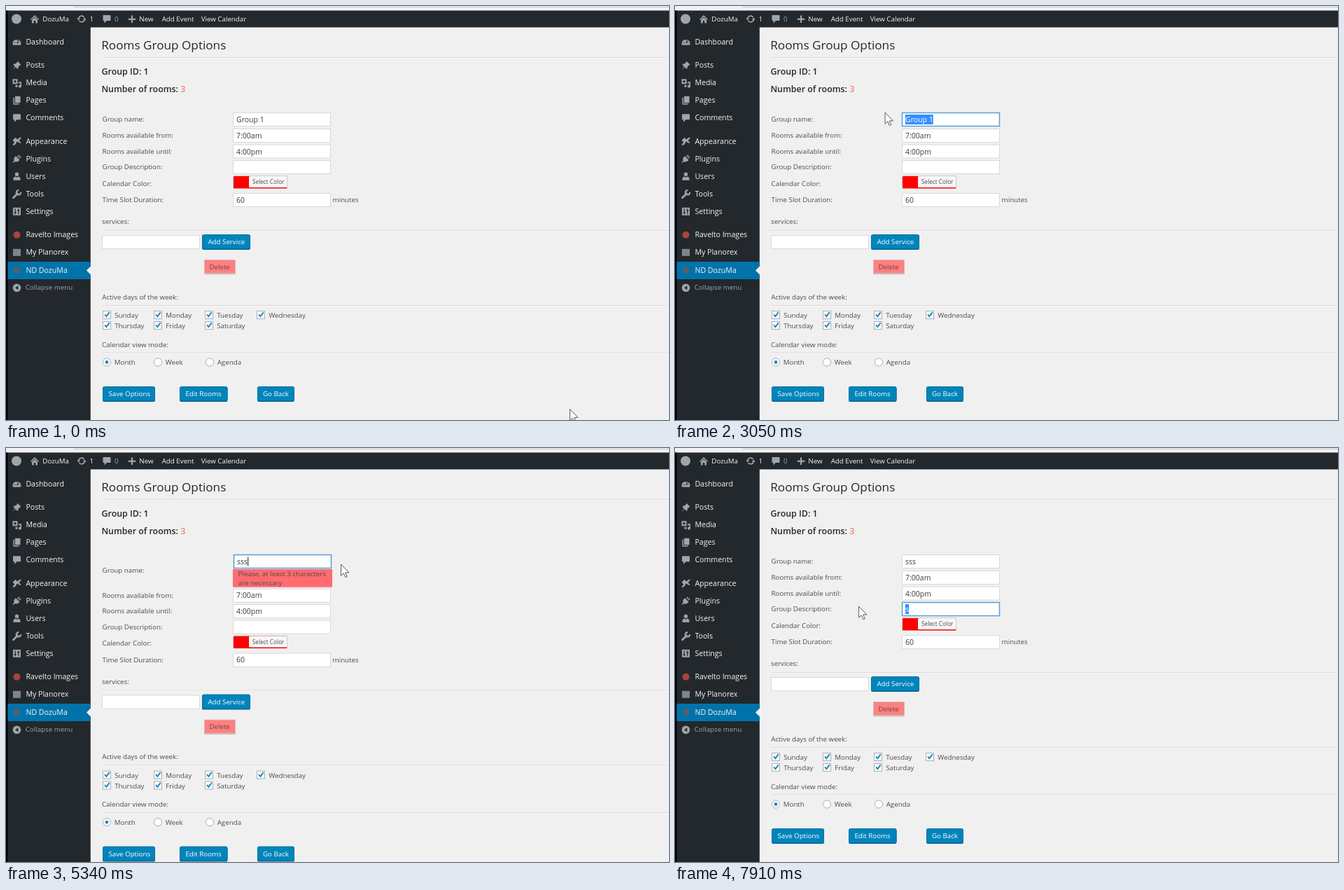
Animation, 947 px wide and 591 px high, one loop 8000 ms. Source, as an HTML page:

```html
<!DOCTYPE html>
<html lang="en">
<head>
<meta charset="utf-8">
<title>Rooms Group Options</title>
<style>
html, body { margin: 0; width: 100%; height: 100%; overflow: hidden; background: #f0f0f0; }
svg { display: block; width: 947px; height: 591px; font-family: "Open Sans", "Noto Sans", sans-serif; font-size: 9.75px; fill: #4c4c4c; }
text { white-space: pre; }
.menu { font-size: 10.6px; fill: #f4f4f4; }
.field { font-size: 10.5px; fill: #3c3c3c; }
.head { font-size: 12.4px; font-weight: 600; fill: #23282d; }
.icon { fill: #a0a5aa; stroke: none; }
.line { fill: none; stroke: #a0a5aa; stroke-width: 1.6; }
.box { fill: #fff; stroke: #d9d9d9; }
.focus { fill: #fff; stroke: #5b9dd9; stroke-width: 1.5; }
</style>
</head>
<body>
<svg id="stage" viewBox="0 0 947 591"></svg>
<script>
const LOOP = 8000, STEP = 78.4, FIRST = 70;
const ERROR_SHIFT = 25.6;
const FIELD_X = 329;

const rect = (x, y, w, h, fill, more = '') =>
  `<rect x="${x}" y="${y}" width="${w}" height="${h}" fill="${fill}" ${more}/>`;
const text = (x, y, s, cls = '', more = '') =>
  `<text x="${x}" y="${y}" class="${cls}" ${more}>${s}</text>`;
const path = (d, cls = 'icon', more = '') => `<path d="${d}" class="${cls}" ${more}/>`;
const disc = (r, fill = '#a0a5aa', x = 0, y = 0) => `<circle cx="${x}" cy="${y}" r="${r}" fill="${fill}"/>`;
const at = (x, y, s) => `<g transform="translate(${x} ${y})">${s}</g>`;
const rule = y => rect(137, y, 810, 1, '#dadada') + rect(137, y + 1, 810, 1, '#f8f8f8');
const input = (x, y) => `<rect class="box" x="${x + .5}" y="${y + .5}" width="139" height="19"/>`;
const button = (x, y, w, tx, s) =>
  rect(x, y + 1, w, 21, '#006799', 'rx="2.2"') +
  rect(x + .5, y + .5, w - 1, 20, '#0085ba', 'rx="2" stroke="#006fa3"') +
  text(tx, y + 14, s, '', 'fill="#fff"');
const check = (x, y, label) =>
  rect(x + .5, y + .5, 11, 11, '#fff', 'stroke="#a9afb4"') +
  path(`M${x + 3} ${y + 5.4}l2.4 2.8 4.4-6`, 'line', 'style="stroke:#1e8cbe;stroke-width:2"') +
  text(x + 17.2, y + 10, label);
const radio = (x, label, on) =>
  `<circle cx="${x}" cy="508.5" r="5.6" fill="#fff" stroke="#a9afb4"/>` +
  (on ? disc(2.4, '#1e8cbe', x, 508.5) : '') + text(x + 10.7, 512, label);

const dark = 'style="stroke:#23282d;stroke-width:1.2"';
const bubble = path('M-4.5-5.5h9q1 0 1 1v6q0 1-1 1h-4.5l-3.5 3.5v-3.5h-1q-1 0-1-1v-6q0-1 1-1z');
const icons = {
  gauge: path('M-5.6 4.5A6 6 0 1 1 5.6 4.5z') + path('M-3.6 1h1.4M0-3.8v1.4M3.6 1H2.2M0 2L2.3-2.2', 'line', dark),
  pin: path('M1-6L6-1 4.5-.4 2.2 2 2 4.5.8 5-1.7 2.5-6 6-2.6 1.6-5-.9-4.4-2-2-2.2.5-4.5z'),
  media: path('M-6-5.5h7v7h-7z') + disc(1.7, '#23282d', -2.5, -2) + path('M2.5-1.5h4v6.2a2 2 0 1 1-1.5-1.8V.5H2.5z') + path('M-2 3h3v3h-3z'),
  pages: path('M-2.5-6h7.5v9.5h-7.5z') + path('M-5-4h1.5v8.5h6.5V6h-8z'),
  bubble,
  brush: path('M-6-1.5L-2-5.5 2.2-1.3-1.8 2.7z') + path('M1.2-3.6L5.2-6 6.2-5 3.2-1 6 1.6 4.8 2.8 1 .6zM-2.8.8L-.6 3-4.6 6-6 4.6z'),
  plug: path('M-1.5-4L4 1.5 2 3.5Q-1 5-3.2 3.7L-5 5.6-6 4.6-4 2.8Q-5 0-3.5-2z') + path('M1-3l2.5-2.5M3-1l2.5-2.5', 'line'),
  user: disc(2.7, undefined, 0, -3) + path('M-5 5.5V3Q-4.5.5-2 .3L0 1.5 2 .3Q4.5.5 5 3v2.5z'),
  wrench: path('M-5 5L1-1', 'line', 'style="stroke-width:2.8;stroke-linecap:round"') + path('M5.6-3A3.2 3.2 0 1 1 2.8-5.7', 'line', 'style="stroke-width:2.2"'),
  sliders: path('M-5.5-5.5h11v11h-11z') + path('M-2.3-4v8M2.3-4v8M-4 1.5h3.4M.6-1.5H4', 'line', dark),
  red: disc(5, '#a8443a'),
  square: rect(-5.5, -5, 11, 10, '#7d858b'),
  dot: disc(5, '#52606c'),
  fold: disc(5.8) + path('M1.8-3v6L-2.4 0z', '', 'fill="#23282d"')
};

const menu = [
  [51, 'gauge', 'Dashboard'], [84.5, 'pin', 'Posts'], [109.5, 'media', 'Media'],
  [134.5, 'pages', 'Pages'], [159.5, 'bubble', 'Comments'], [193, 'brush', 'Appearance'],
  [218, 'plug', 'Plugins'], [243, 'user', 'Users'], [268.5, 'wrench', 'Tools'],
  [293, 'sliders', 'Settings'], [326.5, 'red', 'Ravelto Images'],
  [351.5, 'square', 'My Planorex'], [377, 'dot', 'ND DozuMa']
];

const chrome =
  rect(0, 0, 947, 6.5, '#f1f1f1') + rect(97, 1, 850, 1, '#c6c6c6') +
  rect(0, 6.5, 947, 24, '#23282d') + rect(0, 30, 120.8, 561, '#23282d') + rect(0, 6.5, 2.5, 585, '#000') +
  rect(2.5, 365, 118.3, 25, '#0073aa') + path('M121 371.5v12l-6-6z', '', 'fill="#f0f0f0"') +
  menu.map(([y, icon, label]) => at(15.5, y + .3, icons[icon]) + text(28.4, y + 3.9, label, 'menu')).join('') +
  at(15.5, 402.3, icons.fold) + text(27.7, 405.4, 'Collapse menu', '', 'fill="#a0a5aa"') +
  at(15, 18.5, disc(7)) +
  at(41, 19, path('M0-6L6 0 5 1 0-3.8-5 1-6 0zM-4 1l4-3.8L4 1v4.5H1.3V2h-2.6v3.5H-4z')) +
  at(108, 18.5, path('M-4.3-1A4.4 4.4 0 0 1 3.6-2.4M4.3 1A4.4 4.4 0 0 1-3.6 2.4', 'line') +
    path('M-6.8-1h5L-4.3 2zM6.8 1h-5L4.3-2z')) +
  at(144, 18.5, bubble) + at(180, 18.8, path('M-5.2 0H5.2M0-5.2V5.2', 'line', 'style="stroke-width:2.2"')) +
  [[52.3, 'DozuMa'], [119.4, '1'], [190.3, 'New'], [222.7, 'Add Event'], [278.7, 'View Calendar']]
    .map(([x, s]) => text(x, 21.8, s, '', 'fill="#f4f4f4"')).join('') +
  text(155, 21.8, '0', '', 'fill="#9ca1a6"');

const heading =
  text(136.2, 62, 'Rooms Group Options', '', 'style="font-size:17.15px;fill:#23282d"') + rule(73) +
  text(136.6, 98, 'Group ID: 1', 'head') +
  text(136.4, 122.6, 'Number of rooms: <tspan fill="#ff7b7b">3</tspan>', 'head');

const lower =
  [[188, 'Rooms available from:'], [210.6, 'Rooms available until:'], [233.2, 'Group Description:'],
   [256.7, 'Calendar Color:'], [280, 'Time Slot Duration:']].map(([y, s]) => text(137.6, y, s)).join('') +
  input(324, 175) + text(FIELD_X, 188.8, '7:00am', 'field') +
  input(324, 197.5) + text(FIELD_X, 211.6, '4:00pm', 'field') +
  '<g id="desc"></g>' +
  rect(324.5, 242.5, 77, 17.5, '#f00', 'rx="2" stroke="#ccc"') + rect(325, 259, 76.5, 1.4, '#f00') +
  rect(347, 243, 54.3, 16, '#f7f7f7', 'rx="1.5"') + rect(401, 243, 1, 16, '#ccc') +
  text(352, 254, 'Select Color', '', 'style="font-size:8.25px"') +
  input(324, 267) + text(FIELD_X, 280.6, '60', 'field') + text(466.6, 280, 'minutes') +
  text(137, 311.4, 'services:') + rule(320) + input(137, 327) +
  button(280, 326, 69, 288.4, 'Add Service') +
  rect(283, 363, 45, 20.3, '#c9bdbd', 'rx="1"') +
  rect(283.5, 362.5, 44, 19, '#ff8080', 'rx="1" stroke="#d9b5b5"') + text(290.4, 375.6, 'Delete', '', 'fill="#6e4444"') +
  text(137.3, 418.8, 'Active days of the week:') + rule(427) +
  ['Sunday', 'Monday', 'Tuesday', 'Wednesday', 'Thursday', 'Friday', 'Saturday']
    .map((d, i) => check([138, 211, 284, 358][i % 4], i < 4 ? 435 : 450, d)).join('') +
  text(136.9, 486.7, 'Calendar view mode:') + rule(494.5) +
  radio(144, 'Month', true) + radio(217, 'Week') + radio(291, 'Agenda') +
  button(138, 543, 75, 146.4, 'Save Options') + button(248, 543, 68.5, 256.4, 'Edit Rooms') +
  button(359, 543, 53, 366.9, 'Go Back');

const error =
  rect(324, 173, 142, 25.7, '#ff6b70') +
  text(331.6, 183.2, 'Please, at least 3 characters') + text(331.8, 195.6, 'are necessary');

const stage = document.getElementById('stage');
stage.innerHTML =
  rect(0, 0, 947, 591, '#f0f0f0') + heading +
  text(137.6, 165, 'Group name:', '', 'id="label"') +
  `<g id="lower">${lower}</g><g id="error">${error}</g><g id="name"></g>` + chrome +
  '<g id="cursor">' +
  path('M0 0V16.2L3.8 12.8 6.3 18.6 8.7 17.6 6.2 11.9H11.4z', '', 'id="arrow" fill="#fff" stroke="#484848" stroke-width=".9"') +
  path('M-4.5-8H-1.2L0-7.2 1.2-8H4.5M-4.5 8H-1.2L0 7.2 1.2 8H4.5M0-7.2V7.2M-1.8 2H1.8', '', 'id="beam" fill="none" stroke="#333" stroke-width="1.3"') +
  '</g>';
const $ = id => document.getElementById(id);

// Editable field: box, text, selection with clipped white copy, caret
function makeField(id, y) {
  const clip = id + 'Clip', base = y + 14;
  $(id).innerHTML =
    `<clipPath id="${clip}"><rect y="${y + 3}" height="14"/></clipPath>` + input(324, y) +
    text(FIELD_X, base, '', 'field') + rect(0, y + 3, 0, 14, '#338fff') +
    text(FIELD_X, base, '', 'field', `style="fill:#fff" clip-path="url(#${clip})"`) +
    rect(0, y + 3.5, 1, 13, '#222');
  const [clipEl, box, plain, mark, light, caret] = $(id).children;
  const edge = i => i === 0 ? FIELD_X : FIELD_X + plain.getSubStringLength(0, i);
  return {
    draw(value, focused, sel) {
      if (plain.textContent !== value) plain.textContent = light.textContent = value;
      box.setAttribute('class', focused ? 'focus' : 'box');
      const [a, b] = sel || [value.length, value.length];
      const x = edge(a), w = edge(b) - x;
      for (const r of [mark, clipEl.firstChild]) {
        r.setAttribute('x', x);
        r.setAttribute('width', focused ? w : 0);
      }
      caret.setAttribute('x', x + .2);
      caret.style.display = focused && a === b ? '' : 'none';
    },
    charAt(x) {
      let best = 0;
      for (let i = 1; i <= plain.textContent.length; i++)
        if (Math.abs(edge(i) - x) < Math.abs(edge(best) - x)) best = i;
      return best;
    }
  };
}
const nameField = makeField('name', 152), descField = makeField('desc', 220);

// Pointer path: time, x, y
const track = [
  [0, 805.5, 575.5], [780, 353, 172], [860, 362, 164], [1120, 362, 164], [1400, 409, 164],
  [1540, 409, 164], [1640, 402, 168], [1710, 402, 168], [1790, 401, 169.5], [2110, 401, 169.5],
  [2180, 401, 168.5], [2510, 401, 168.5], [3040, 300, 152], [3250, 300, 152], [3620, 425, 115.5],
  [4060, 468, 160], [4225, 473, 167], [4460, 541, 180], [4640, 475, 147], [4860, 410, 163],
  [4930, 410, 163], [5323, 478.5, 166], [5700, 540, 190], [5780, 540, 190], [5950, 574, 241],
  [6180, 394, 230], [6340, 396, 231], [6480, 396, 231], [6960, 594, 303], [7260, 554, 296],
  [7320, 554, 296], [7590, 390, 225], [7640, 390, 225], [7900, 262.5, 226]
];
function pointer(t) {
  const i = track.findIndex(k => k[0] > t);
  if (i < 0) return track[track.length - 1].slice(1);
  const [t0, x0, y0] = track[i - 1], [t1, x1, y1] = track[i];
  const u = (t - t0) / (t1 - t0), e = u * u * (3 - 2 * u);
  return [x0 + (x1 - x0) * e, y0 + (y1 - y0) * e];
}

const between = (t, a, b) => t >= a && t < b;
const within = (x, y, top, left = 324) => between(x, left, left + 140) && between(y, top, top + 20);

function draw(t) {
  const tick = t < FIRST ? 0 : FIRST + Math.floor((t - FIRST) / STEP + .1) * STEP;
  const [x, y] = pointer(tick);
  const failed = between(t, 3900, 5730), dy = failed ? ERROR_SHIFT : 0;

  $('label').setAttribute('y', failed ? 178 : 165);
  $('lower').setAttribute('transform', `translate(0 ${dy})`);
  $('error').style.display = failed ? '' : 'none';
  $('name').setAttribute('transform', `translate(${failed ? 1 : 0} 0)`);

  const name = t < 3280 ? 'Group 1' : t < 5030 ? 's' : t < 5180 ? 'ss' : 'sss';
  let sel = null;
  if (between(t, 1170, 2430)) sel = [6, Math.max(6, nameField.charAt(t < 1420 ? x : 409))];
  else if (between(t, 2580, 3280)) sel = [nameField.charAt(x), 7];
  nameField.draw(name, between(t, 1170, 3900) || between(t, 4800, 5810), sel);

  const desc = t < 6730 ? '' : 's';
  descField.draw(desc, between(t, 6500, 7180) || t >= 7580, t >= 7640 ? [descField.charAt(x), 1] : null);

  const beam = within(x, y, 152) || [175, 197.5, 220, 267].some(top => within(x, y, top + dy)) ||
    within(x, y, 327 + dy, 137);
  $('cursor').setAttribute('transform', `translate(${x} ${y})`);
  $('arrow').style.display = beam ? 'none' : '';
  $('beam').style.display = beam ? '' : 'none';
}

const start = performance.now();
function frame(now) {
  draw(Math.max(0, now - start) % LOOP);
  requestAnimationFrame(frame);
}
draw(0);
requestAnimationFrame(frame);
</script>
</body>
</html>
```
